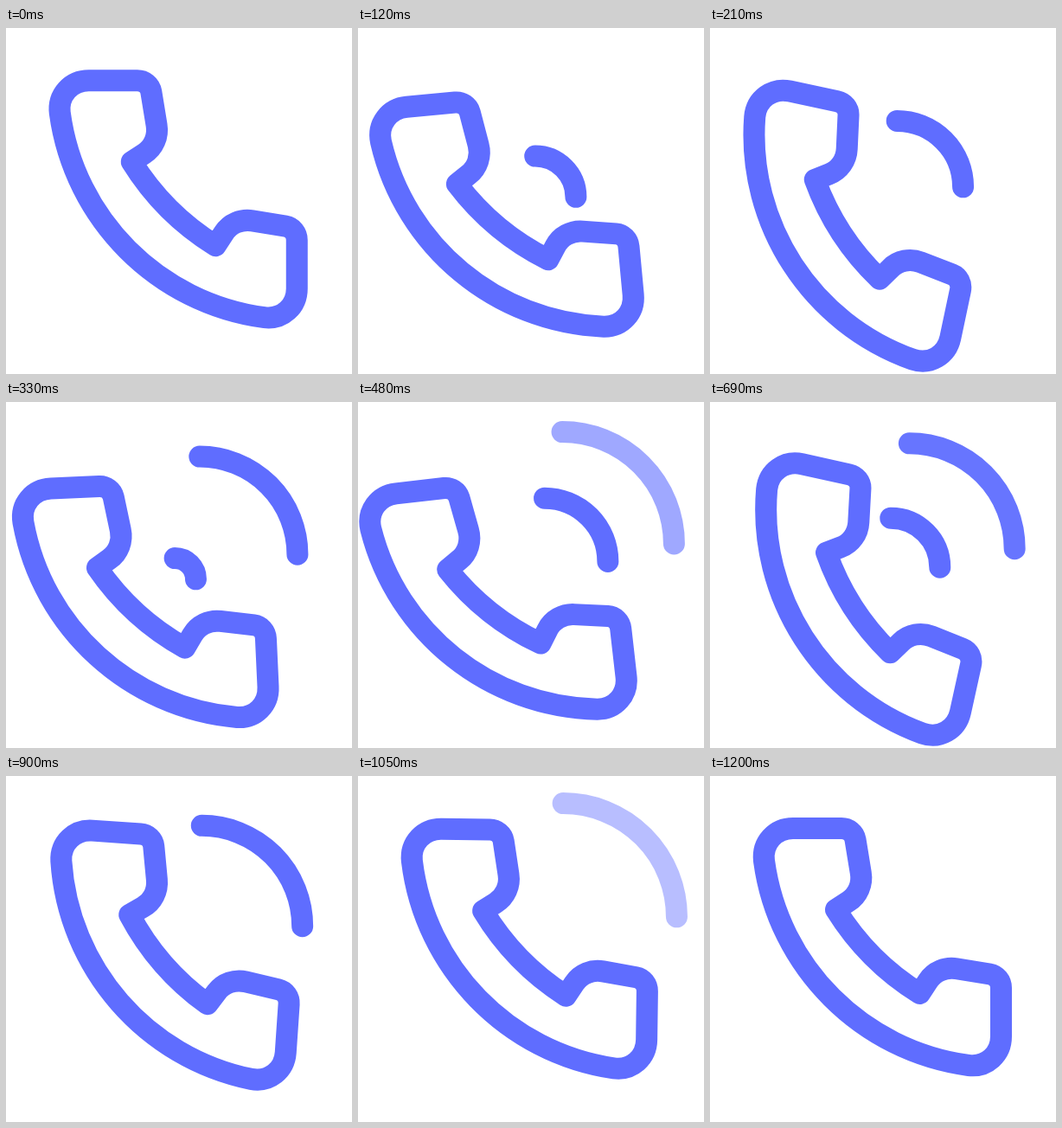
An HTML page for the animation above (1230 ms loop, 400x400 px).

```html
<!DOCTYPE html>
<html lang="en">
<head>
<meta charset="utf-8">
<title>Ringing phone</title>
<style>
  html, body { margin: 0; height: 100%; overflow: hidden; background: #fff; }
  svg { display: block; width: 100vw; height: 100vh; }
</style>
</head>
<body>
<svg viewBox="0 0 400 400" fill="none" stroke="#5f6dff" stroke-width="25" stroke-linecap="round" stroke-linejoin="round">
  <path id="phone" d="M96 60.5H152C160 60.5 166.700 66 168 73.500L174.300 112C176.500 125 171 138 160 145L145.500 154.500
    C170 194 203 227 242.500 251.500L252 237C259 226 272 220.500 285 222.700L323.500 229C331 230.300 336.500 237 336.500 245V301
    C336.500 321.500 320 337 299 334.500C176 318 79 221 62.500 98C60 77 75.500 60.500 96 60.500Z"/>
  <path class="wave"/>
  <path class="wave"/>
  <path class="wave"/>
</svg>
<script>
const LOOP = 1230;
const WAVE_STARTS = [50, 330, 590];
const phone = document.getElementById('phone');
const waves = document.querySelectorAll('.wave');

// [time, x, y]
const SHIFT = [[0, 0, 0], [120, -27, 21], [215, -35, 30], [330, -38, 35], [480, -37, 33.5], [570, -33, 33],
  [690, -22, 29], [780, -14, 20], [900, -6, 9], [1050, -1.5, 2], [1170, 0, 0]];
// [time, radius, drift of the centre along the diagonal]
const WAVE = [[-45, 9, -11], [0, 24, -5], [150, 73, 15.5], [280, 113, 23.75], [430, 129.3, 36], [540, 136.5, 40]];

const clamp = v => Math.min(1, Math.max(0, v));
const smooth = p => p * p * (3 - 2 * p);
const easeOut = power => p => 1 - (1 - p) ** power;

// [end time, end angle, easing]
const SWING = [[100, -7, smooth], [215, 12, smooth], [500, -6.5, easeOut(3)], [690, 12.5, smooth], [1170, 0, easeOut(2)]];

function sample(keys, t) {
  let i = 1;
  while (i < keys.length - 1 && t > keys[i][0]) i++;
  const a = keys[i - 1], b = keys[i];
  const p = clamp((t - a[0]) / (b[0] - a[0]));
  return [1, 2].map(k => a[k] + (b[k] - a[k]) * p);
}

function swing(t) {
  let start = 0, from = 0;
  for (const [end, to, ease] of SWING) {
    if (t < end) return from + (to - from) * ease((t - start) / (end - start));
    [start, from] = [end, to];
  }
  return from;
}

function draw(now) {
  const t = now % LOOP;
  phone.setAttribute('transform', `translate(${sample(SHIFT, t)}) rotate(${swing(t)} 193 200)`);
  waves.forEach((wave, i) => {
    const age = t - WAVE_STARTS[i];
    const [r, drift] = sample(WAVE, age);
    const x = 200 + drift, y = 200 - drift;
    wave.setAttribute('d', `M${x} ${y - r}A${r} ${r} 0 0 1 ${x + r} ${y}`);
    wave.setAttribute('opacity', clamp((age + 45) / 30) * clamp((550 - age) / 200));
  });
  requestAnimationFrame(draw);
}
draw(0);
</script>
</body>
</html>
```
